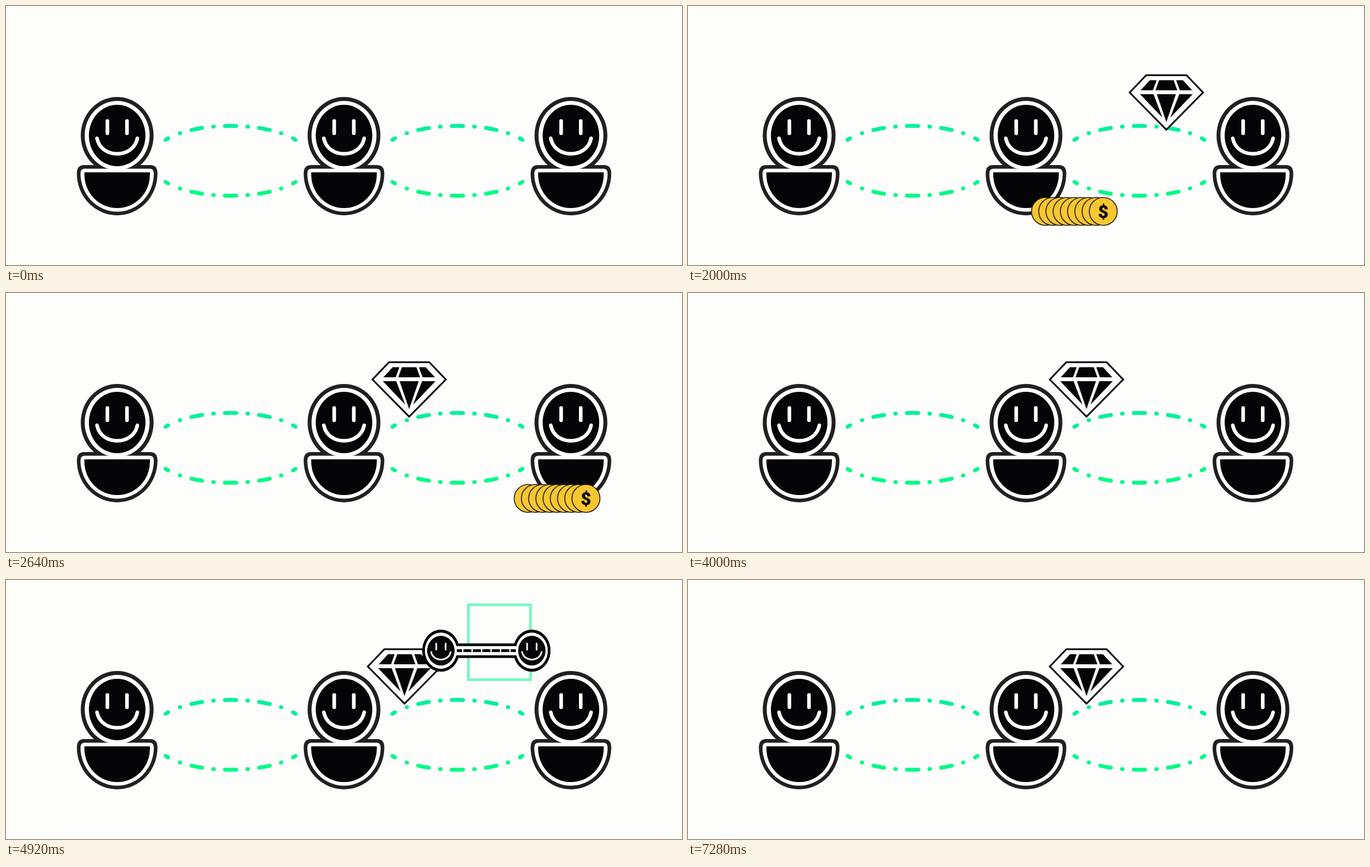
Write an HTML page that moves like this. It is 1207 px wide and 464 px high and loops after 8000 ms.

```html
<!DOCTYPE html>
<html lang="en">
<head>
<meta charset="utf-8">
<title>Trade between three people</title>
<style>
  html, body { margin: 0; width: 100%; height: 100%; overflow: hidden; background: #fdfdfc; }
  svg { display: block; width: 100%; height: 100%; color: #fff; }

  .ink { fill: #231f20; }
  .black { fill: #050507; }
  .white { fill: #fff; }
  .line { fill: none; stroke: currentColor; stroke-width: 6.5; stroke-linecap: round; }
  .link { fill: none; stroke-width: 7; stroke-linecap: round; }
  .coin { fill: #f8c631; stroke: #1c1910; stroke-width: 1.6; }
  .dollar { font: 900 32px Roboto, Arial, sans-serif; text-anchor: middle; }
  .green { fill: none; stroke: #0cf290; }

  /* One loop is 8 s, so 1% is 80 ms. */
  .anim { animation: 8s linear infinite both; }
  #diamond { animation-name: diamond-move; }
  #diamond-pop { animation-name: diamond-pop; }
  #coins { animation-name: coins-move; }
  #coins-pop { animation-name: coins-pop; }
  #paper { animation-name: paper-out; }
  #sheet { animation-name: sheet-in; }
  #pact-fade { animation-name: pact-fade; }
  #pact { animation-name: pact-rise; color: #e6e6e6; }
  #pact-size { animation-name: pact-shrink; }
  #check { animation-name: check-in; }

  @keyframes diamond-move {
    0%, 21% { transform: translate(896.5px, 173px); animation-timing-function: cubic-bezier(.4, 0, .2, 1); }
    37.25%, 100% { transform: translate(711.5px, 173px); }
  }
  @keyframes coins-move {
    0%, 21% { transform: translate(597px, 368px); animation-timing-function: cubic-bezier(.4, 0, .2, 1); }
    37.25%, 100% { transform: translate(1002px, 368px); }
  }
  @keyframes diamond-pop {
    0%, 12.5% { transform: scale(0); animation-timing-function: cubic-bezier(.34, 1.56, .64, 1); }
    20.5%, 100% { transform: scale(1); }
  }
  @keyframes coins-pop {
    0%, 12.5% { transform: scale(0); animation-timing-function: cubic-bezier(.34, 1.56, .64, 1); }
    20.5% { transform: scale(1); }
    40% { transform: scale(1); animation-timing-function: cubic-bezier(.36, 0, .66, -.56); }
    50%, 100% { transform: scale(0); }
  }
  @keyframes sheet-in {
    0%, 59.5% { opacity: 0; }
    63.25%, 100% { opacity: 1; }
  }
  @keyframes pact-fade {
    0%, 55.4% { opacity: 0; }
    57%, 100% { opacity: 1; }
  }
  @keyframes pact-rise {
    0%, 55.5% { transform: translateY(222px); animation-timing-function: cubic-bezier(.4, 0, .2, 1); }
    70%, 100% { transform: translateY(73.5px); }
  }
  @keyframes pact-shrink {
    0%, 55.5% { transform: translateX(808.5px) scale(1.11); animation-timing-function: cubic-bezier(.45, 0, .55, 1); }
    65.5%, 100% { transform: translateX(881px) scale(.186); }
  }
  @keyframes check-in {
    0% { opacity: 0; animation-timing-function: step-end; }
    75%, 100% { opacity: 1; }
  }
  @keyframes paper-out {
    0%, 87.4% { opacity: 1; }
    91%, 100% { opacity: 0; }
  }
</style>
</head>
<body>
<svg viewBox="0 0 1207 464" preserveAspectRatio="none">
  <defs>
    <g id="face">
      <ellipse class="black" rx="50.5" ry="55"/>
      <path class="line" d="M-17.5-26V-4M17.5-26V-4M-36 5C-29 42 29 42 36 5"/>
    </g>
    <g id="person">
      <ellipse class="ink" cy="232" rx="65" ry="69"/>
      <path class="ink" d="M-59 285H59Q72 285 72 300A72 75 0 0 1-72 300Q-72 285-59 285Z"/>
      <ellipse class="white" cy="232" rx="58" ry="62"/>
      <path class="white" d="M-58 291.5H58Q65.5 291.5 65.5 300A65.5 68.5 0 0 1-65.5 300Q-65.5 291.5-58 291.5Z"/>
      <path class="black" d="M-58.5 298H58.5V302A58.5 60 0 0 1-58.5 302Z"/>
      <use href="#face" y="232"/>
    </g>
    <g id="pact-head">
      <ellipse class="white" rx="59" ry="67"/>
      <use href="#face"/>
    </g>
  </defs>

  <g id="links"></g>
  <use href="#person" x="198.5"/>
  <use href="#person" x="603.5"/>
  <use href="#person" x="1008.7"/>

  <g id="diamond" class="anim"><g id="diamond-pop" class="anim">
    <path d="M-36-49H36L65.5-18 0 48.5-65.5-18Z" fill="#fff" stroke="#020204" stroke-width="3"/>
    <path class="black" d="M-46-22-29.5-40H-17.5L-24-22ZM-13-40H13L19.5-22H-19.5ZM46-22 29.5-40H17.5L24-22Z
      M-47-15H-23L-7 27ZM-17-15H17L0 35ZM47-15H23L7 27Z"/>
  </g></g>

  <g id="coins" class="anim"><g id="coins-pop" class="anim">
    <g id="coin-row"></g>
    <text class="dollar" x="51.5" y="11.5">$</text>
  </g></g>

  <g id="paper" class="anim">
    <rect id="sheet" class="anim green" x="825.5" y="44.5" width="111" height="134" stroke-width="5" style="fill:#fdfdfc"/>
    <g id="pact-fade" class="anim"><g id="pact" class="anim"><g id="pact-size" class="anim">
      <ellipse cx="-168" rx="69" ry="78"/>
      <ellipse cx="168" rx="69" ry="78"/>
      <rect x="-140" y="-27" width="280" height="54"/>
      <rect class="white" x="-140" y="-17" width="280" height="34"/>
      <path d="M-155 0H155" stroke="#050507" stroke-width="10" stroke-dasharray="30 5"/>
      <use href="#pact-head" x="-168"/>
      <use href="#pact-head" x="168"/>
    </g></g></g>
    <path id="check" class="anim green" d="M869 86.5 879.5 95 911 61.5" stroke-width="6"/>
  </g>
</svg>
<script>
  const add = (parent, tag, attrs) => {
    const node = document.createElementNS('http://www.w3.org/2000/svg', tag);
    for (const key in attrs) node.setAttribute(key, attrs[key]);
    document.getElementById(parent).append(node);
  };

  // Each link is a flat ellipse arc made of mirrored dashes and dots.
  const RX = 135, RY = 51;
  const spans = [[-10, 10], [30, 31], [51, 70], [90, 90.6], [111.5, 116]];
  const drop = dx => RY * (1 - Math.sqrt(1 - (dx / RX) ** 2));

  function drawLink(cx, y, dir, stroke) {
    const point = dx => `${cx + dx} ${y + dir * drop(dx)}`;
    const dash = (a, b) => `M${point(a)}A${RX} ${RY} 0 0 ${dir > 0 ? 1 : 0} ${point(b)}`;
    const d = spans.map(([a, b]) => dash(a, b) + dash(-b, -a)).join('');
    add('links', 'path', { d, stroke, class: 'link' });
  }

  for (const cx of [401, 806]) {
    drawLink(cx, 214.8, 1, '#04f09c');
    drawLink(cx, 340, -1, '#04f986');
  }
  for (let i = 0; i < 9; i++) {
    add('coin-row', 'circle', { cx: (i - 4) * 12.9, r: 25, class: 'coin' });
  }
</script>
</body>
</html>
```
